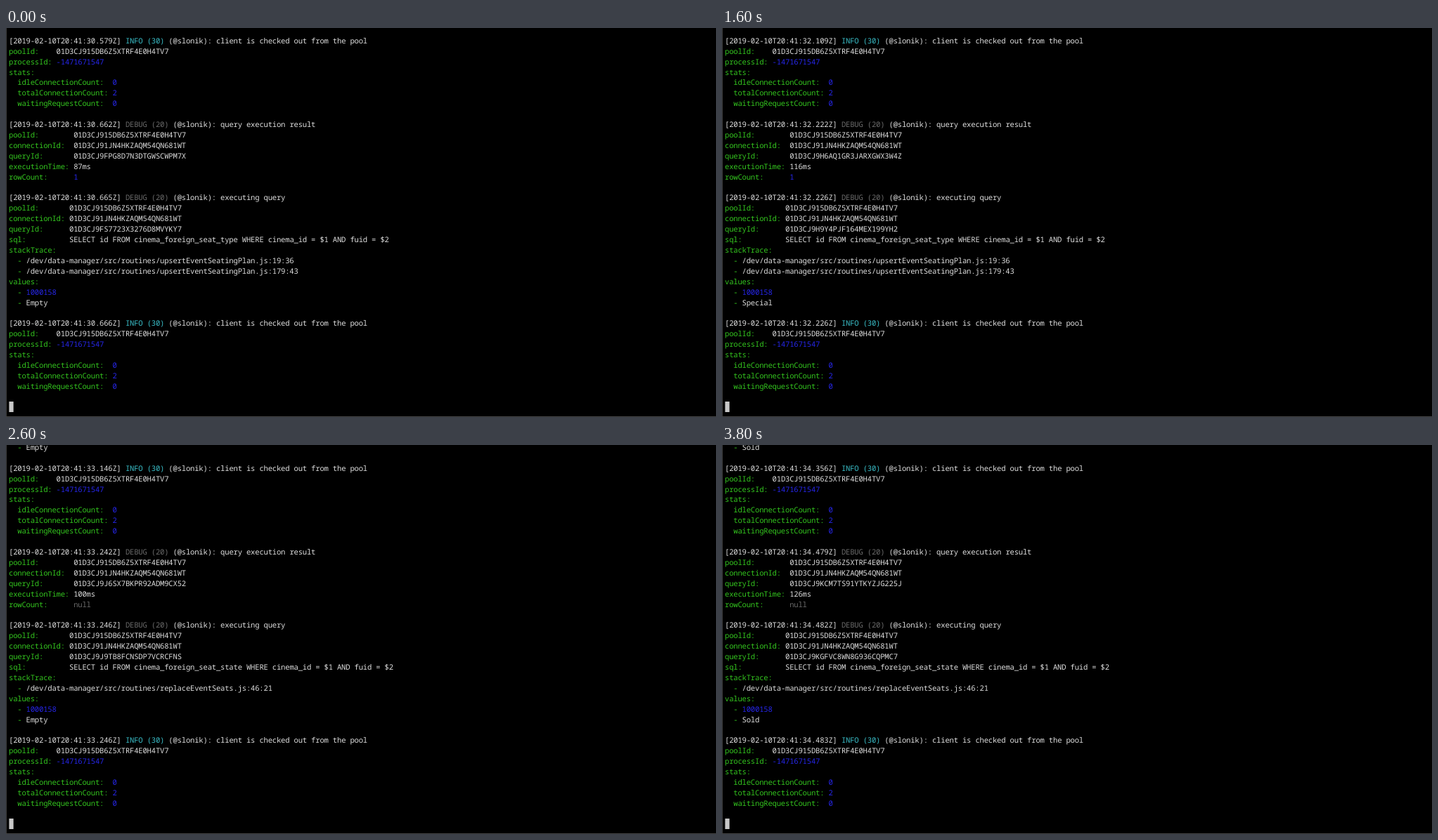
These frames come from a looping animation (1010 by 554 pixels, 3.85 s). An HTML page:

```html
<!DOCTYPE html>
<html lang="en">
<head>
<meta charset="utf-8">
<title>Query log</title>
<style>
  html, body { margin: 0; width: 100%; height: 100%; overflow: hidden; background: #000; }
  svg { display: block; width: 100%; height: 100%; }
  text {
    font: 10.6px "Noto Sans Mono", "DejaVu Sans Mono", monospace;
    letter-spacing: -0.212px;
    white-space: pre;
    text-rendering: geometricPrecision;
  }
</style>
</head>
<body>
<svg viewBox="0 0 1010 554">
  <rect width="1010" height="554" fill="#000"/>
  <rect width="1" height="554" fill="#3c3c3c"/>
  <rect y="553" width="1010" height="1" fill="#444"/>
  <g id="screen"></g>
  <rect x="4.4" y="532" width="6.2" height="15" fill="#c8c8c8"/>
</svg>
<script>
const LOOP = 3850, ROWS = 36, COLS = 163, LINE = 14.909;
const WHITE = '#dedede', GREEN = '#33c41e', BLUE = '#2626ea', CYAN = '#3abfc9', GRAY = '#6a6a6a';
const ID = '01D3CJ9';
const POOL = ID + '15DB6Z5XTRF4E0H4TV7', CONNECTION = ID + '1JN4HKZAQM54QN681WT';

let seed = 41;
function random() {
  seed = (seed * 1664525 + 1013904223) >>> 0;
  return seed / 4294967296;
}
const pick = (chars, n) => Array.from({ length: n }, () => chars[Math.floor(random() * chars.length)]).join('');

// Ids carry their creation time in base 32
const BASE32 = '0123456789ABCDEFGHJKMNPQRSTVWXYZ';
const makeId = ms => [10, 5, 0].map(s => BASE32[(ms + 15501) >> s & 31]).join('') + pick(BASE32, 16);

const hashes = Array.from({ length: 20 }, () => pick('0123456789abcdef', 64)).concat(`
1dd27549b9a470e9ea06e114b717f9719dc2202df18f74105ae910fd27fc8483
9b3735ace28353fdfaa8cba5eb9513dd1971730c18d3051fadd4f594004db41c
850ae8cd2c9dec842752f31f4031b2c7b270c3ccaa71476b0f7c0965bf2b6832
4ec0f3a82dd062598394b35468eaaa83d30554cde3c4e281b94e0526121d7eb1
7a3442d721109a2fb5fbcce7ae9734d4db82e2341ba1e3b3165f2a3aeff30e2e
38c057712f9dbfff64fb6dde0b249daa0abee625edb42d84637e56922fe76a2e
8681ba0663a2f358b2c9b3c5de9f3c2fcfa0da4b0ea1ff66379ddc282ad25f87
e1ee3b90698b9ee2e58ae792423f857dda148debac845b3a1ab630d9f59447fd
c1c956f9b1ee1ba6746ecf0a5171a437577e37a9a26339983604d7a698f29cb7
f21ad137b3a0560f995a0200097abf38c48a20919e0882d0885d5875bb8c86af
bc6a2912b0a2078ad30b7d0a50a779f4383be7584f7d00f52a55d695db658cc5
3706d83a7183f809ad9d863d2485422fffa4baa9f5ef9997c8de44cea23e2f45
8ee1731278d0375684bbb0e79fc91ab5e6f305be2589a88ea493076230ba2f7e
9d07f992c5b2fa240b0fd4ead056ffa97b214596f350b784ef67c3db4694deec
34f53fad4e7842ce90613d0bdbf1937736b3d63e40b88d3c281de53037f22f57
958bd7ebf995779d59f9361fa6fa6a8d36f013d0dd5f3729c85d6f01c70de570
7ae78d4c6e7f9466aab6df25a07ad1b82bfc32feb33f361cb58ab71a46e2f59e
af9faaa75cd576a21b0da96ba0125c2d6dc79b6ae491a8a65f761385395500d4
b7c0d523322ab2a3709e9c262cbb04975e9aa006df2111de5453ccd374391312
27542eeb3b5b181c78e2a17a8bd4e4d223251d7ce60ab868b407dbc93be9db9b
4f5db19b73d944552f53dfde48f9f22e33ae755979ec4176d27dbb59730a49e6
08142256293390aecf04c14b28401698f4604999c0cce635037e5a158f104008
8feab36c882c649f1655e51271bcc97ab6881f8880d24f93cf51ee7b12989b7e
8781d6f8c2a11c1735698cd0cbfa73c0a058f5bbdaf32c9a4fd2801d360ecdde
228cdae5b41574f61a8f7b6e05be44c68bf0d56f134286cd5b821121f88b7431
d26d8fe13e1b911132d5737237ee7672253511487878e934b93ca7518a0b8cb6`.trim().split('\n'));

const ROUTINES = '/dev/data-manager/src/routines/';
const PLAN = ['upsertEventSeatingPlan.js:19:36', 'upsertEventSeatingPlan.js:179:43'];
const seatRows = Array.from({ length: 36 }, (_, i) => `($${i * 3 + 1}, $${i * 3 + 2}, $${i * 3 + 3})`).join(', ');

const KINDS = {
  type: { sql: 'SELECT id FROM cinema_foreign_seat_type WHERE cinema_id = $1 AND fuid = $2', trace: PLAN, rows: 1 },
  bulk: { sql: `INSERT INTO seating_plan_seat (seating_plan_id, cinema_foreign_seat_type_id, fuid) VALUES ${seatRows} ON CONFLICT DO NOTHING`, trace: PLAN, rows: null },
  seats: { sql: 'SELECT id, fuid FROM seating_plan_seat WHERE fuid = ANY($1) AND cinema_id = $2', trace: ['replaceEventSeats.js:21:30'], rows: 46 },
  clear: { sql: 'DELETE FROM event_seat WHERE cinema_id = $1', trace: ['replaceEventSeats.js:30:14'], rows: null },
  insert: { sql: 'INSERT INTO cinema_foreign_seat_state (cinema_id, fuid) VALUES ($1, $2) ON CONFLICT (cinema_id, fuid) DO NOTHING', trace: ['replaceEventSeats.js:38:16'], rows: null },
  state: { sql: 'SELECT id FROM cinema_foreign_seat_state WHERE cinema_id = $1 AND fuid = $2', trace: ['replaceEventSeats.js:46:21'], rows: 1 }
};

// A line is a list of [colour, text] spans
const log = [], steps = [];
const put = (...spans) => log.push(spans);
const mark = at => steps.push({ at, end: log.length });
const colorOf = v => v === null ? GRAY : typeof v === 'number' ? BLUE : WHITE;

function header(ms, level, message) {
  put([WHITE, `[2019-02-10T20:41:${(30 + ms / 1000).toFixed(3)}Z] `],
    [level === 'INFO (30)' ? CYAN : GRAY, level], [WHITE, ` (@slonik): ${message}`]);
}

function pair(key, value, width, indent = '') {
  const room = COLS - width - indent.length;
  const text = String(value);
  put([GREEN, indent + (key + ':').padEnd(width)], [colorOf(value), text.slice(0, room)]);
  for (let i = room; i < text.length; i += COLS) put([WHITE, text.slice(i, i + COLS)]);
}

function item(value, indent = '  ') {
  if (Array.isArray(value)) {
    put([GREEN, indent + '-']);
    value.forEach(v => item(v, indent + '  '));
  } else {
    put([GREEN, indent + '- '], [colorOf(value), String(value)]);
  }
}

function logResult(q, ms, took) {
  header(ms, 'DEBUG (20)', 'query execution result');
  pair('poolId', POOL, 15);
  pair('connectionId', CONNECTION, 15);
  pair('queryId', ID + q.id, 15);
  pair('executionTime', took + 'ms', 15);
  pair('rowCount', KINDS[q.kind].rows, 15);
  put();
}

function logQuery(q) {
  const { sql, trace } = KINDS[q.kind];
  header(q.exec, 'DEBUG (20)', 'executing query');
  pair('poolId', POOL, 14);
  pair('connectionId', CONNECTION, 14);
  pair('queryId', ID + q.id, 14);
  pair('sql', sql, 14);
  put([GREEN, 'stackTrace:']);
  trace.forEach(t => item(ROUTINES + t));
  put([GREEN, 'values:']);
  q.values.forEach(v => item(v));
  put();
}

function logClient(ms) {
  header(ms, 'INFO (30)', 'client is checked out from the pool');
  pair('poolId', POOL, 11);
  pair('processId', -1471671547, 11);
  put([GREEN, 'stats:']);
  pair('idleConnectionCount', 0, 22, '  ');
  pair('totalConnectionCount', 2, 22, '  ');
  pair('waitingRequestCount', 0, 22, '  ');
  put();
}

// at: when the query shows; exec: log clock in ms
// opt.res / opt.mid: when the preceding result / the query alone shows
let last = null;
function query(at, exec, kind, value, opt = {}) {
  const q = { exec, kind, info: exec + (opt.lag || 0), id: opt.id || makeId(exec) };
  q.values = kind === 'seats' ? [hashes, 1000158] : value ? [1000158, value] : [1000158];
  if (last) logResult(last, exec - (opt.gap || 3), opt.ms || exec - last.info);
  if (opt.res) mark(opt.res);
  logQuery(q);
  if (opt.mid) mark(opt.mid);
  logClient(q.info);
  mark(at);
  last = q;
}

query(-1, 578, 'type', 'Empty', { lag: 1, id: 'FPG8D7N3DTGWSCWPM7X' });
query(0, 665, 'type', 'Empty', { lag: 1, ms: 87, id: 'FS7723X3276D8MVYKY7' });
query(100, 757, 'type', 'Empty');
query(200, 848, 'type', 'Empty');
query(300, 941, 'type', 'Empty', { res: 250 });
query(400, 1036, 'type', 'Empty');
query(500, 1130, 'type', 'Empty', { res: 450, lag: 1, id: 'G7T4Q6GXYTS56GVM8BD' });
query(600, 1227, 'type', 'Empty', { ms: 94, id: 'GAR0PV9JNZ76JQZQ4N3' });
query(650, 1319, 'type', 'Empty');
query(750, 1412, 'type', 'Empty');
query(850, 1507, 'type', 'Empty');
query(950, 1602, 'type', 'Empty');
query(1000, 1690, 'type', 'Empty');
query(1100, 1782, 'type', 'Empty');
query(1200, 1880, 'type', 'Empty');
query(1300, 1986, 'type', 'Special', { res: 1250 });
query(1450, 2109, 'type', 'Special', { res: 1400, id: 'H6AQ1GR3JARXGWX3W4Z' });
query(1600, 2226, 'type', 'Special', { ms: 116, gap: 4, id: 'H9Y4PJF164MEX199YH2' });
query(1700, 2334, 'type', 'Special');
query(1800, 2441, 'type', 'Special');
query(1950, 2553, 'bulk', '', { res: 1850 });
query(2050, 2664, 'bulk', '');
query(2200, 2777, 'seats', '', { res: 2100, mid: 2150 });
query(2350, 2900, 'clear', '', { res: 2300 });
query(2450, 3023, 'clear', '', { res: 2400 });
query(2500, 3146, 'insert', 'Empty', { id: 'J6SX7BKPR92ADM9CX52' });
query(2600, 3246, 'state', 'Empty', { gap: 4, id: 'J9TB8FCNSDP7VCRCFNS' });
query(2750, 3371, 'insert', 'Special', { res: 2700 });
query(2900, 3496, 'state', 'Special', { res: 2850 });
query(3000, 3621, 'insert', 'Reserved', { res: 2950, id: 'JNN5PJ9H03WQ3HJJB8T' });
query(3100, 3730, 'state', 'Reserved', { gap: 2, id: 'JS052E5ZPAK5DM90FDP' });
query(3200, 3855, 'insert', 'Blocked', { res: 3150 });
query(3300, 3980, 'state', 'Blocked');
query(3450, 4105, 'insert', 'House', { res: 3400 });
query(3550, 4230, 'state', 'House');
query(3700, 4355, 'insert', 'Sold', { res: 3650, lag: 1, id: 'KCM7TS91YTKYZJG225J' });
query(3800, 4482, 'state', 'Sold', { lag: 1, id: 'KGFVC8WN8G936CQPMC7' });

const screen = document.getElementById('screen');
const span = ([color, text]) => `<tspan fill="${color}">${text}</tspan>`;

function draw(step) {
  const start = Math.max(0, step.end - ROWS);
  screen.innerHTML = log.slice(start, step.end).map((line, row) =>
    line.length ? `<text x="4" y="${(6.9 + row * LINE).toFixed(2)}">${line.map(span).join('')}</text>` : ''
  ).join('');
}

let shown = null;
function tick() {
  const t = performance.now() % LOOP;
  const step = steps.filter(s => s.at <= t).pop();
  if (step !== shown) draw(shown = step);
  requestAnimationFrame(tick);
}
tick();
</script>
</body>
</html>
```
